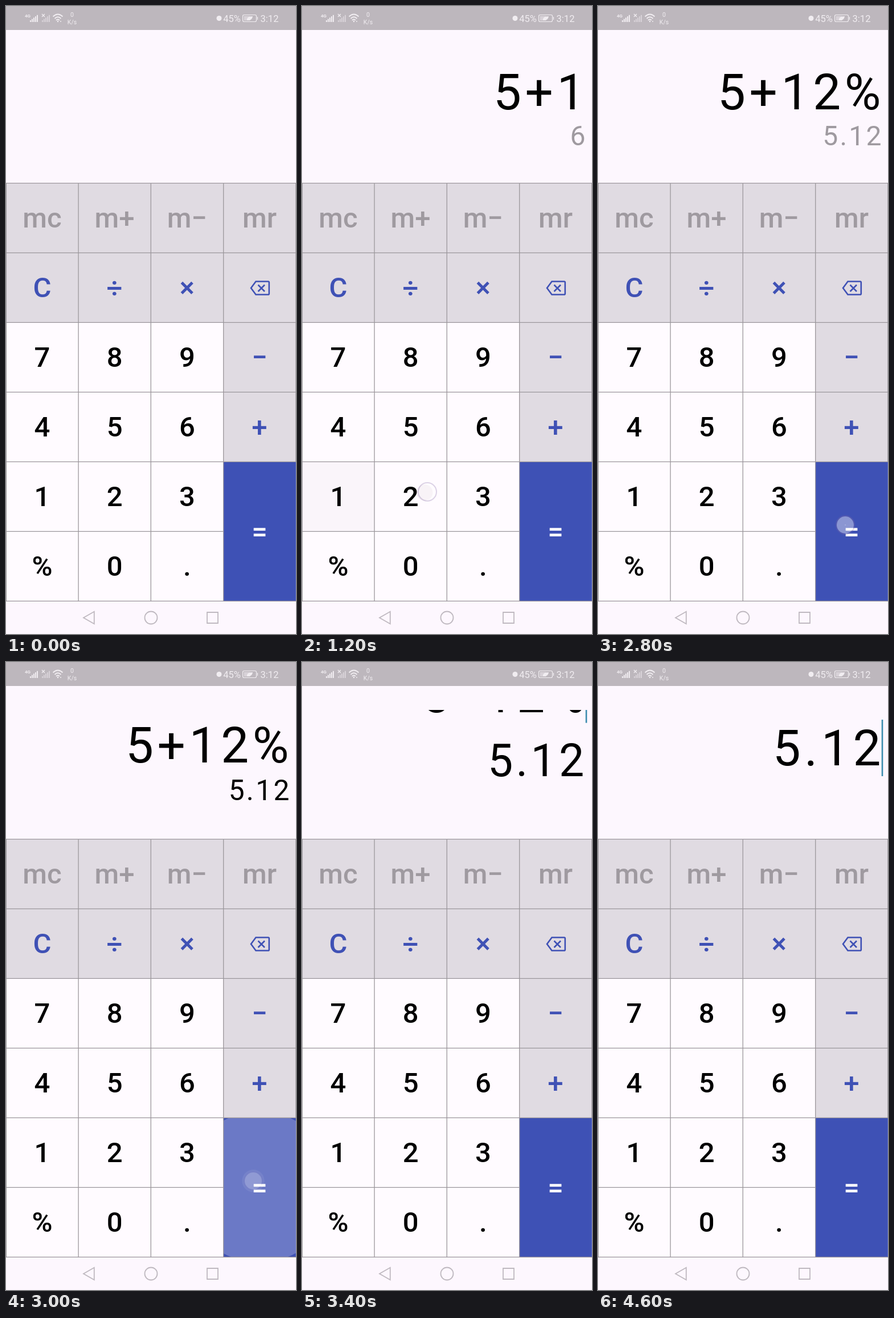
Write an HTML page with a canvas that moves like this. It is 509 px wide and 1100 px high and loops after 4800 ms.

```html
<!DOCTYPE html>
<html lang="en">
<head>
<meta charset="utf-8">
<title>Calculator</title>
<style>
  html, body { margin: 0; width: 100%; height: 100%; overflow: hidden; background: #fdf7fe; }
  canvas { display: block; }
</style>
</head>
<body>
<canvas id="stage" width="509" height="1100"></canvas>
<script>
const ctx = document.getElementById('stage').getContext('2d');
const LOOP = 4800;
const BLUE = '#3f51b5', GREY = '#9f9aa0', LINE = '#9b979c', PALE = '#e0dbe2', PAPER = '#fffbff', BACK = '#fdf7fe';
const GRID_TOP = 310, CELL_W = 127.2, CELL_H = 122;
const ROWS = [['mc', 'm+', 'm−', 'mr'], ['C', '÷', '×', '⌫'], ['7', '8', '9', '−'],
              ['4', '5', '6', '+'], ['1', '2', '3', '='], ['%', '0', '.']];

const keys = ROWS.flatMap((row, r) => row.map((label, c) => ({
  label,
  x: c * CELL_W, y: GRID_TOP + r * CELL_H,
  w: CELL_W, h: label === '=' ? 2 * CELL_H : CELL_H,
  fill: label === '=' ? '#3e51b5' : r < 2 || c === 3 ? PALE : PAPER,
  ink: label === '=' ? '#fff' : r === 0 ? GREY : r === 1 || c === 3 ? BLUE : '#000'
})));

// Finger presses, with what the display reads once each is released
const taps = [
  { key: '5', down: 90, up: 230, x: 212, y: 733, formula: '5', result: '' },
  { key: '+', down: 650, up: 740, x: 447, y: 730, formula: '5+', result: '' },
  { key: '1', down: 830, up: 960, x: 82, y: 850, formula: '5+1', result: '6' },
  { key: '2', down: 1180, up: 1330, x: 220, y: 851, formula: '5+12', result: '17' },
  { key: '%', down: 1500, up: 1640, x: 82, y: 975, formula: '5+12%', result: '5.12' },
  { key: '=', down: 2800, up: 2908, x: 434, y: 909, formula: '5+12%', result: '5.12' }
];
const EVALUATE = 2908, SETTLED = 3860;

const clamp = v => Math.max(0, Math.min(1, v));
const mix = (a, b, p) => a + (b - a) * p;
const ease = (t, start, length) => (1 - Math.cos(Math.PI * clamp((t - start) / length))) / 2;

function text(str, x, y, size, color, { weight = 400, align = 'center', spacing = 0 } = {}) {
  ctx.font = `${weight} ${size}px Roboto, sans-serif`;
  ctx.letterSpacing = spacing + 'px';
  ctx.textAlign = align;
  ctx.fillStyle = color;
  ctx.fillText(str, x, y);
}

function rect(x, y, w, h, color) {
  ctx.fillStyle = color;
  ctx.fillRect(x, y, w, h);
}

function stroke(path, color, width) {
  ctx.strokeStyle = color;
  ctx.lineWidth = width;
  ctx.stroke(new Path2D(path));
}

function disc(x, y, r, color) {
  ctx.fillStyle = color;
  ctx.beginPath();
  ctx.arc(x, y, r, 0, 2 * Math.PI);
  ctx.fill();
}

function drawStatusBar() {
  const ink = '#f1edf1', faint = '#d8d2d8';
  rect(0, 0, 509, 42, '#bdb7bd');
  text('4G', 38, 20, 8, ink, { weight: 700 });
  for (let i = 0; i < 5; i++) {
    const h = 3 + i * 2.3;
    rect(42 + i * 3, 28 - h, 2, h, ink);
    rect(63 + i * 3, 28 - h, 2, h, faint);
  }
  stroke('M63 14l5 5M68 14l-5 5', ink, 1.3);
  stroke('M82.5 18.5Q91 10.5 99.5 18.5M85.5 22Q91 16.5 96.5 22M88 25Q91 22 94 25', ink, 1.8);
  disc(91, 27, 1.3, ink);
  disc(96, 27, 1, ink);
  text('0', 116, 19, 10.5, ink);
  text('K/s', 116, 32, 10.5, ink);
  disc(374, 21.5, 4.5, ink);
  text('45%', 396.5, 28, 16.5, ink);
  stroke('M418 15.5H437Q439.5 15.5 439.5 18V25Q439.5 27.5 437 27.5H418Q415.5 27.5 415.5 25V18Q415.5 15.5 418 15.5M441.5 19V24', ink, 1.2);
  rect(417.5, 17.5, 11, 8, faint);
  ctx.fillStyle = ink;
  ctx.fill(new Path2D('M423 25Q422 18 433 18Q432 26 423 25'));
  text('3:12', 462.5, 28, 16.5, ink);
}

function drawRipple(key, tap, t) {
  const grow = clamp((t - tap.down) / 250);
  const fade = clamp((t - Math.max(tap.up, tap.down + 250)) / 200);
  if (!grow || fade === 1) return;
  const p = 1 - (1 - grow) ** 2;
  const [tint, strength] = key.label === '=' ? ['255,255,255', 0.23]
    : key.fill === PAPER ? ['60,0,40', 0.06] : ['0,0,0', 0.09];
  ctx.save();
  ctx.beginPath();
  ctx.rect(key.x, key.y, key.w, key.h);
  ctx.clip();
  disc(mix(tap.x, key.x + key.w / 2, p), mix(tap.y, key.y + key.h / 2, p),
    Math.hypot(key.w, key.h) / 2 * p, `rgba(${tint},${strength * (1 - fade)})`);
  ctx.restore();
}

function drawKeys(t) {
  for (const key of keys) {
    rect(key.x, key.y, key.w, key.h, key.fill);
    for (const tap of taps) if (tap.key === key.label) drawRipple(key, tap, t);
    const cx = key.x + key.w / 2 - 0.2, cy = key.y + key.h / 2;
    if (key.label === '⌫') {
      stroke('M438.5 482.5H460Q461.8 482.5 461.8 484.3V503.7Q461.8 505.5 460 505.5H438.5L430 494ZM442.5 488.5L454 500M454 488.5L442.5 500', BLUE, 2.6);
    } else {
      text(key.label, cx, cy + 17, 49, key.ink, { weight: 500 });
    }
  }
  for (let i = 0; i <= 6; i++) {
    const y = GRID_TOP + i * CELL_H + 0.3;
    stroke(`M0 ${y}H${i === 5 ? 382 : 509}`, LINE, 1.3);
  }
  for (const x of [0.4, 127.1, 254.3, 381.7]) stroke(`M${x} 310V1042`, LINE, 1.3);
  stroke('M508.6 310V798', LINE, 1);
}

function drawNavigation() {
  const ink = '#bfb9c0';
  stroke('M136 1071.5L154.8 1060.8V1082.2Z', ink, 1.8);
  stroke('M243.5 1071.5a11 11 0 1 0 22 0a11 11 0 1 0 -22 0', ink, 1.8);
  stroke('M353 1062H372V1081H353Z', ink, 1.8);
}

function drawDisplay(t) {
  const last = taps.filter(tap => tap.up <= t).pop();
  const settled = t >= SETTLED;
  const formula = settled ? '5.12' : last ? last.formula : '';
  const travel = ease(t, EVALUATE, 784);
  const lift = settled ? 0 : -134 * travel;

  ctx.save();
  ctx.beginPath();
  ctx.rect(0, 84, 509, 226);
  ctx.clip();
  text(formula, 503.2, 181 + lift, 87, '#000', { align: 'right', spacing: 6.7 });
  if (t % 1000 >= 300 && t % 1000 < 800) rect(497.7, 101 + lift, 2.6, 99, '#3a8cae');
  if (last && !settled) {
    const size = mix(48, 86, ease(t, EVALUATE, 690));
    text(last.result, 500.6, mix(244, 181, travel), size, t >= EVALUATE ? '#000' : GREY,
      { align: 'right', spacing: size * 0.066 });
  }
  ctx.restore();
}

function drawTouch(tap, t) {
  const leave = clamp((t - tap.up) / 180);
  if (t < tap.down || leave === 1) return;
  const seen = 1 - leave;
  disc(tap.x, tap.y, 15, `rgba(255,255,255,${0.4 * seen})`);
  if (leave) disc(tap.x, tap.y, 15 + 9 * leave, `rgba(255,255,255,${0.15 * seen})`);
  stroke(`M${tap.x - 16} ${tap.y}a16 16 0 1 0 32 0a16 16 0 1 0 -32 0`,
    `rgba(130,105,165,${0.28 * seen * seen})`, 2);
}

function frame(now) {
  const t = now % LOOP;
  rect(0, 0, 509, 1100, BACK);
  drawStatusBar();
  drawDisplay(t);
  drawKeys(t);
  drawNavigation();
  for (const tap of taps) drawTouch(tap, t);
}

const start = performance.now();
function tick() {
  frame(performance.now() - start);
  requestAnimationFrame(tick);
}
tick();
</script>
</body>
</html>
```
